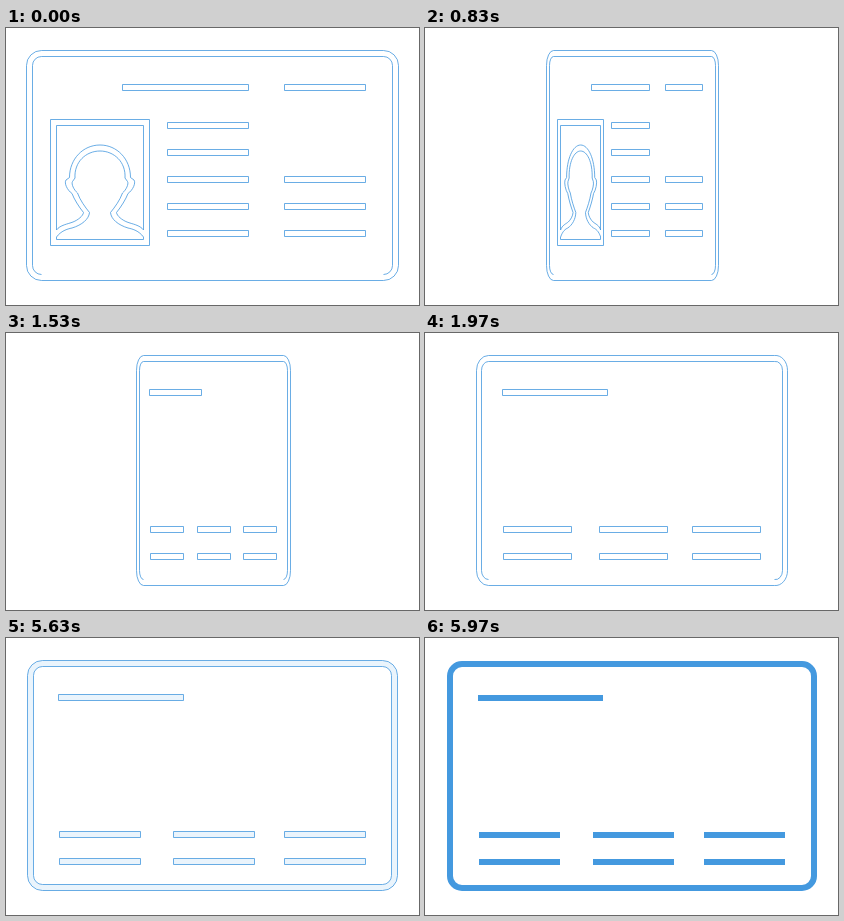
These frames come from a looping animation (413x277 px, 6.01 s). An HTML page with a canvas:

```html
<!DOCTYPE html>
<html>
<head>
<meta charset="utf-8">
<title>Card flip</title>
<style>
  html, body { margin: 0; height: 100%; overflow: hidden; background: #fff; }
  canvas { display: block; }
</style>
</head>
<body>
<canvas id="stage" width="413" height="277"></canvas>
<script>
const ctx = document.getElementById('stage').getContext('2d');
const LOOP = 6010, STEP = 40, TURN = 60, CENTER = 208.3;
const FILL_START = 5630, FILL_STEPS = 9;
const BLUE = '#4499df';

// Left half of the portrait, mirrored about x = 94.
const half = new Path2D(
  'M50.5 202C54 197 62 196 67 194C72 192 77 188 77.5 184.5' +
  'C73 179 68 171 66 165.5C61 162 58 155 60 152L63.5 149.5C63.5 131 77 117 94 117' +
  'M50.5 209C55 203 61 201 66 200C76 197 83 191 83.5 184.5' +
  'C79 179 74 172 71.5 165C68 162 65 156 66.5 153.5L69 150C68 134 80 123 94 123');
const portrait = new Path2D(half);
portrait.addPath(half, new DOMMatrix([-1, 0, 0, 1, 188, 0]));

// Squeezes x towards the centre, keeping upright edges on whole pixels.
const squeeze = (x, scale) => Math.floor(CENTER + (x - CENTER) * scale) + 0.5;

function rim(X, l, r, t, b, rad) {
  const x0 = X(l), x1 = X(l + rad), x2 = X(r - rad), x3 = X(r);
  const arc = `A${x1 - x0} ${rad} 0 0 1 `;
  return `M${x1} ${b}${arc}${x0} ${b - rad}V${t + rad}${arc}${x1} ${t}` +
    `H${x2}${arc}${x3} ${t + rad}V${b - rad}${arc}${x2} ${b}`;
}

const bar = (X, x, y, w = 81, h = 6) =>
  `M${X(x)} ${y}H${X(x + w)}v${h}H${X(x)}z`;
const bars = (X, xs, ys) => xs.map(x => ys.map(y => bar(X, x, y)).join('')).join('');

function front(scale) {
  const X = x => squeeze(x, scale), l = X(50.5), r = X(137.5);
  const p = new Path2D(
    rim(X, 20.5, 392.5, 22.5, 252.5, 15) + 'z' + rim(X, 26.5, 386.5, 28.5, 246.5, 9) +
    bar(X, 44.5, 91.5, 99, 126) +
    `M${l} 202V97.5H${r}V202M${l} 209V211.5H${r}V209` +
    bar(X, 116.5, 56.5, 126) + bars(X, [278.5], [56.5]) +
    bars(X, [161.5], [94.5, 121.5]) + bars(X, [161.5, 278.5], [148.5, 175.5, 202.5]));
  p.addPath(portrait, new DOMMatrix([scale, 0, 0, 1, CENTER * (1 - scale), 0]));
  return p;
}

// The inner bottom edge only appears once the rim is closed.
function back(scale, end = '') {
  const X = x => squeeze(x, scale);
  return new Path2D(
    rim(X, 21.5, 391.5, 22.5, 252.5, 15) + 'z' +
    rim(X, 27.5, 385.5, 28.5, 246.5, 9) + end +
    bar(X, 52.5, 56.5, 125) + bars(X, [53.5, 167.5, 278.5], [193.5, 220.5]));
}

function draw(t) {
  ctx.clearRect(0, 0, 413, 277);
  ctx.strokeStyle = ctx.fillStyle = BLUE;
  ctx.lineWidth = 0.8;

  if (t < FILL_START) {
    const n = Math.min(TURN, Math.floor((t + 10) / STEP));
    const facing = Math.abs(Math.cos(Math.PI * n / TURN));
    const scale = 1 - 0.988 * (1 - facing);
    ctx.stroke(n < TURN / 2 ? front(scale) : back(scale));
    return;
  }

  const k = Math.min(FILL_STEPS, 1 + Math.floor((t - FILL_START + 20) / STEP));
  const solid = k === FILL_STEPS;
  const card = back(1, 'z');
  ctx.save();
  if (solid) ctx.translate(0.5, 0.5);
  ctx.globalAlpha = k / FILL_STEPS;
  ctx.fill(card, 'evenodd');
  ctx.restore();
  if (!solid) ctx.stroke(card);
}

const start = performance.now();
function tick() {
  draw((performance.now() - start) % LOOP);
  requestAnimationFrame(tick);
}
tick();
</script>
</body>
</html>
```
